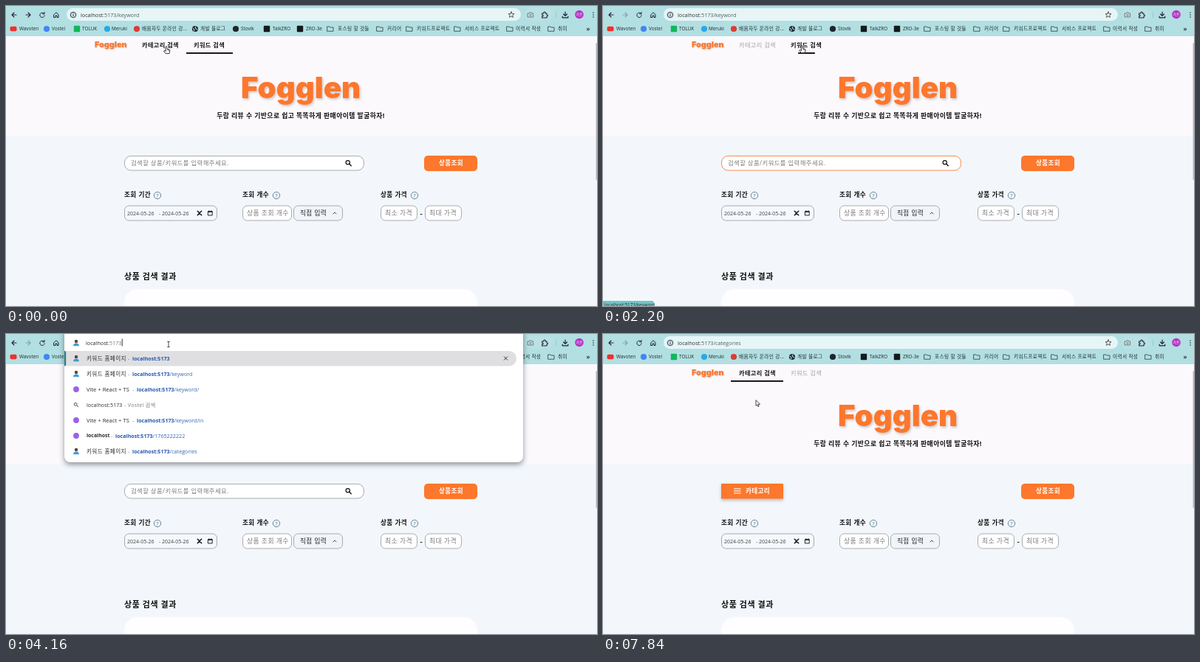
These frames come from a looping animation (800x407 px, 8000 ms). An HTML page with a canvas:

```html
<!DOCTYPE html>
<html lang="ko">
<head>
<meta charset="utf-8">
<title>Fogglen</title>
<style>
html, body { margin: 0; width: 100%; height: 100%; overflow: hidden; background: #f3f7fc; }
canvas { display: block; width: 800px; height: 407px; }
</style>
</head>
<body>
<canvas id="stage"></canvas>
<script>
const W = 800, H = 407, LOOP = 8000, STEP = 40;
const SANS = '"Open Sans", "Noto Sans CJK KR", "Noto Sans CJK", sans-serif';
const ORANGE = '#fd772c', INK = '#1c1c1e', GREY = '#7b7b7b', EDGE = '#a9abae';
const BRAND = 'Fogglen', HOST = 'localhost:5173';
const HANGUL = /[가-힣]/;

const canvas = document.getElementById('stage');
const dpr = window.devicePixelRatio || 1;
canvas.width = W * dpr;
canvas.height = H * dpr;
const c = canvas.getContext('2d');

// ---------- helpers ----------
// Hangul is set slightly smaller with open tracking.
function text(s, x, y, size, color = INK, weight = 400, align = 'left', family = SANS) {
  const korean = HANGUL.test(s), px = korean ? size * 0.95 : size;
  c.font = `${weight} ${px}px ${family}`;
  c.letterSpacing = korean ? `${px * 0.05}px` : '0px';
  c.textAlign = align;
  c.fillStyle = color;
  c.fillText(s, x, y + px * 0.36);
  return x + c.measureText(s).width;
}

function rect(x, y, w, h, fill) {
  c.fillStyle = fill;
  c.fillRect(x, y, w, h);
}

function paint(fill, stroke, lw) {
  if (fill) { c.fillStyle = fill; c.fill(); }
  if (stroke) { c.strokeStyle = stroke; c.lineWidth = lw; c.stroke(); }
}

function box(x, y, w, h, r, fill, stroke, lw = 1) {
  c.beginPath();
  c.roundRect(x, y, w, h, r);
  paint(fill, stroke, lw);
}

function dot(x, y, r, fill, stroke, lw = 1) {
  c.beginPath();
  c.arc(x, y, r, 0, 7);
  paint(fill, stroke, lw);
}

function icon(x, y, d, stroke, lw = 1, fill) {
  const p = new Path2D(d);
  c.save();
  c.translate(x, y);
  c.lineJoin = c.lineCap = 'round';
  if (fill) { c.fillStyle = fill; c.fill(p); }
  if (stroke) { c.strokeStyle = stroke; c.lineWidth = lw; c.stroke(p); }
  c.restore();
}

function shadowed(color, blur, dx, dy, draw) {
  c.save();
  c.shadowColor = color;
  c.shadowBlur = blur * dpr;
  c.shadowOffsetX = dx * dpr;
  c.shadowOffsetY = dy * dpr;
  draw();
  c.restore();
}

// ---------- timeline ----------
const visits = [
  { at: -1000, route: 'keyword' },
  { at: 380, route: 'categories' },
  { at: 2120, route: 'keyword' },
  { at: 6400, route: 'categories' }
];
const moves = [
  [0, 217, 54.5], [440, 215, 54], [840, 214, 54], [1240, 156, 15], [1560, 156, 15],
  [1980, 268, 53], [2360, 270, 54], [2720, 153, 14], [2800, 152, 14],
  [3200, 181, 14], [3400, 220, 14], [4580, 220, 14], [4720, 207, 26],
  [4840, 194, 19], [7140, 194, 19], [7320, 192, 12], [7840, 207, 90], [LOOP, 207, 90]
];

const between = (t, a, b) => t >= a && t < b;

function pointer(t) {
  const i = moves.findIndex(m => m[0] > t);
  const [t0, x0, y0] = moves[i - 1], [t1, x1, y1] = moves[i];
  const k = (t - t0) / (t1 - t0), e = k * k * (3 - 2 * k);
  return { x: x0 + (x1 - x0) * e, y: y0 + (y1 - y0) * e };
}

function stateAt(t) {
  const visit = visits.filter(v => v.at <= t).pop();
  const p = pointer(t);
  const k = Math.min(1, (t - visit.at) / 400);
  const onTabs = p.y > 42 && p.y < 66;
  return {
    t, p, route: visit.route,
    grow: 1 - (1 - k) * (1 - k),
    canForward: visit === visits[0],
    hover: onTabs && between(p.x, 173, 244) ? 'categories'
      : onTabs && between(p.x, 244, 307) ? 'keyword' : '',
    focused: between(t, 2120, 3720) || between(t, 6240, 6400),
    editing: between(t, 3720, 4120),
    open: between(t, 4120, 6360),
    status: between(t, 120, 920) ? 'categories' : between(t, 1960, 2440) ? 'keyword' : ''
  };
}

// ---------- browser chrome ----------
const bookmarks = [
  ['Wavoten', 18, 10, '#f0302b', 'pill'], ['Vostel', 62, 55, '#4285f4', 'dot'],
  ['TOLUK', 103, 96, '#12b75a', 'square'], ['Meruki', 143, 137, '#28a9e6', 'dot'],
  ['배움자두 온라인 강...', 184, 177, '#dd3a35', 'dot'], ['개발 블로그', 263, 256, '#24303a', 'globe'],
  ['Stovik', 318, 311, '#20252b', 'dot'], ['TalkZRO', 361, 353, '#16191c', 'square'],
  ['ZRO-3e', 406, 398, '#16191c', 'square'], ['포스팅 할 것들', 449, 439],
  ['커리어', 516, 506], ['키워드프로젝트', 556, 546], ['서비스 프로젝트', 621, 611],
  ['이력서 작성', 690, 682], ['취미', 747, 738]
];

function bookmark([label, tx, x, color, kind = 'folder']) {
  const y = 31;
  if (kind === 'pill') box(x - 4.5, y - 3.2, 9, 6.4, 2, color);
  if (kind === 'square') box(x - 4.2, y - 4.2, 8.4, 8.4, 1, color);
  if (kind === 'dot' || kind === 'globe') dot(x, y, 4.1, color);
  if (kind === 'globe') icon(x, y, 'M-3 -1L-1 1L-1.5 3M1 -3L0 -1L3 1', '#cfe6ea', 1);
  if (kind === 'folder') icon(x, y, 'M-4 -3H-1L0 -2H4V3.2H-4Z', '#3f4b4f', 0.9);
  text(label, tx, y, HANGUL.test(label) ? 7 : 6.4, '#1f2b2e');
}

function star(x, y) {
  let d = '';
  for (let i = 0; i < 10; i++) {
    const a = i * Math.PI / 5 - Math.PI / 2, r = i % 2 ? 1.9 : 4.2;
    d += `${i ? 'L' : 'M'}${r * Math.cos(a)} ${r * Math.sin(a)}`;
  }
  icon(x, y, d + 'Z', '#333', 0.8);
}

function person(x, y) {
  dot(x, y - 2, 2.2, '#5b4637');
  icon(x, y, 'M-4 4.2Q-3.6 .6 0 .6Q3.6 .6 4 4.2Z', null, 0, '#3f9bd6');
}

function toolbar(s) {
  rect(0, 0, W, 41, '#b2dfe2');
  icon(11, 12, 'M3 0H-3M0 -3L-3 0L0 3', '#223', 1.1);
  icon(30, 12, 'M-3 0H3M0 -3L3 0L0 3', s.canForward ? '#223' : '#7fa3a7', 1.1);
  icon(49, 12, 'M2.6 -1.6A3.2 3.2 0 1 0 3.2 .8M3 -3.6V-1.2H.6', '#223', 1);
  icon(68, 12, 'M-3 -.4L0 -3.2L3 -.4V3.5H1V1H-1V3.5H-3Z', '#223', 1);
  const hover = s.p.y < 20 && s.p.x > 82;
  box(82, 3, 615, 17, 8.5, s.editing ? '#fff' : hover ? '#dff1f2' : '#e7f5f6',
    s.editing ? '#2b7a80' : null);
  dot(91, 12, 5.6, '#d3ecee');
  dot(91, 12, 3.6, null, '#223', 0.9);
  rect(90.6, 11.3, 0.9, 2.6, '#223');
  rect(90.6, 9.8, 0.9, 0.9, '#223');
  if (s.editing) rect(100, 6, 80, 12, '#a9cdf5');
  const end = text(HOST.slice(0, 9), 101, 12, 7.2, '#2a3537');
  text(HOST.slice(9) + '/' + s.route, end, 12, 7.2, '#4f6266');
  star(684, 12);

  box(702, 3, 39, 17, 8.5, '#bae1e4');
  icon(710, 12, 'M-3.6 -2H-1.8L-1 -3.2H1L1.8 -2H3.6V3H-3.6Z', '#777b7c', 1);
  dot(710, 12.4, 1.2, null, '#777b7c', 0.8);
  icon(729, 12, 'M-3.4 -2H-1.2Q-1.4 -4 0 -4Q1.4 -4 1.2 -2H3V0Q4.6 0 4.4 1.2Q4.4 2 3 2V4H-3.4V2Q-1.8 2 -1.8 1Q-1.8 0 -3.4 0Z', '#223', 1.1);
  rect(744, 8, 0.7, 8, '#8fc4c8');
  icon(757, 12, 'M0 -4V1.2M-2.4 -1L0 1.4L2.4 -1M-3.8 2V3.8H3.8V2', '#223', 1.2);
  dot(776, 11.5, 5.8, '#b535c4');
  text('가온', 776, 11.5, 4.8, '#fff', 400, 'center');
  for (const y of [9, 12, 15]) dot(795, y, 0.8, '#223');

  bookmarks.forEach(bookmark);
  text('»', 788, 30.5, 9, '#223', 600, 'center');
}

// ---------- page ----------
function logo(x, y, size, align, depth) {
  shadowed('rgba(90,60,40,.27)', depth * 1.6, depth * 0.8, depth, () =>
    text(BRAND, x, y, size, ORANGE, 900, align, 'Inter, Lato, sans-serif'));
}

function tab(s, name, label, x, left, width) {
  const active = s.route === name, lit = active || s.hover === name;
  text(label, x, 53, 8.6, lit ? '#111' : '#a3a3a3', lit ? 700 : 500);
  if (active) rect(left + width / 2 * (1 - s.grow), 63, width * s.grow, 1.8, '#000');
}

function heading(label, x, markX) {
  text(label, x, 256, 9.1, '#111', 700);
  dot(markX, 257, 4.7, null, '#56788c', 0.9);
  text('?', markX, 257, 7, '#476b80', 400, 'center');
}

function field(x, w, label, tx, size, fill = '#fff', color = GREY) {
  box(x + 0.5, 271, w - 1, 20, 6, fill, EDGE);
  if (label) text(label, tx, 281, size, color);
}

function searchBox(s) {
  box(160.5, 203.5, 324, 19.5, 8.5, '#fff', s.focused ? '#f58a50' : EDGE);
  text('검색할 상품/키워드를 입력해주세요.', 169, 213, 8.8, GREY);
  if (s.focused && s.t > 6200) rect(168.5, 207, 0.9, 12, '#222');
  dot(462.7, 212.2, 2.6, null, '#111', 1.2);
  icon(464.8, 214.3, 'M0 0L2.4 2.4', '#111', 1.5);
}

function categoryButton() {
  shadowed('rgba(90,60,40,.3)', 4, 0, 2, () => rect(160, 203, 84, 20.5, ORANGE));
  for (const y of [209.4, 212.4, 215.4]) rect(177, y, 9.6, 1.1, '#fff');
  text('카테고리', 193, 213, 9, '#fff', 700);
}

function page(s) {
  rect(0, 41, W, 366, '#f3f7fc');
  rect(0, 41, W, 135, '#fcf9fd');

  logo(120, 52.5, 10.8, 'left', 1);
  tab(s, 'categories', '카테고리 검색', 184, 173, 71);
  tab(s, 'keyword', '키워드 검색', 254, 244, 63);
  logo(399, 111, 40.2, 'center', 2);
  text('두람 리뷰 수 기반으로 쉽고 똑똑하게 판매아이템 발굴하자!', 399, 149, 9.3, '#111', 700, 'center');

  if (s.route === 'keyword') searchBox(s); else categoryButton();
  box(566, 203, 72, 21, 5, ORANGE);
  text('상품조회', 602.5, 213, 9, '#fff', 700, 'center');

  heading('조회 기간', 160, 205);
  heading('조회 개수', 320, 366);
  heading('상품 가격', 507, 553);

  field(160, 126, '2024-05-26', 164, 7, '#f5f8fc', '#444');
  text('-', 207, 281, 7, '#444');
  text('2024-05-26', 211, 281, 7, '#444');
  icon(262, 281, 'M-2.7 -2.7L2.7 2.7M2.7 -2.7L-2.7 2.7', '#111', 1.5);
  icon(276.5, 281, 'M-2.7 -2.4H2.7V3H-2.7ZM-2.7 -1.6H2.7M-1.6 -3.2V-2.4M1.6 -3.2V-2.4', '#111', 0.9);
  field(320, 67, '상품 조회 개수', 326, 9.3);
  field(389, 67, '직접 입력', 398, 9.1, '#f1f5fa', '#222');
  icon(445, 281, 'M-2.1 1L0 -1.1L2.1 1', '#333', 0.9);
  field(507, 50, '최소 가격', 513, 9.3);
  text('-', 562, 282, 10, '#111', 600, 'center');
  field(567, 50, '최대 가격', 573, 9.3);

  text('상품 검색 결과', 160, 367, 11.6, '#111', 700);
  box(160, 384, 478, 60, 18, '#fefdff');

  box(798.6, 50, 2, 186, 1, '#b4b6b9');
  if (s.status) {
    box(-4, 400, s.status === 'keyword' ? 73 : 82, 12, 3, '#74c3c6');
    text(`${HOST}/${s.status}`, 2, 405.5, 6.2, '#16383b');
  }
}

// ---------- address suggestions ----------
const rows = [
  ['키워드 홈페이지', '', 171], ['키워드 홈페이지', '/keyword', 171],
  ['Vite + React + TS', '/keyword/', 177], null,
  ['Vite + React + TS', '/keyword/in', 177], ['localhost', '/1765222222', 148],
  ['키워드 홈페이지', '/categories', 171]
];

function suggestion(row, i) {
  const y = 33 + i * 21;
  if (!row) {
    dot(94.2, y - 0.7, 1.9, null, '#444', 0.9);
    icon(95.7, y + 0.8, 'M0 0L2 2', '#444', 1);
    text(HOST, 109, y, 7.2, '#333');
    text('- Vostel 검색', 160, y, 7.4, GREY);
    return;
  }
  const [title, path, x] = row;
  const local = title === 'localhost', korean = HANGUL.test(title);
  if (korean) person(95, y); else dot(95, y, 3.9, '#9a62e8');
  text(title, 109, y, korean ? 8 : local ? 6.9 : 7.6, '#2b2b2d', local ? 700 : 400);
  text('-', x - 6, y, 7.4, GREY);
  const end = text(HOST, x, y, 7.1, '#2559ae', 700);
  text(path, end, y, 7.2, '#3767b5');
}

function suggestions(s) {
  shadowed('rgba(30,40,50,.5)', 7, 0, 3, () => box(79, -10, 621, 184, 8, '#fff'));
  person(95, 12);
  const mid = text(HOST.slice(0, 9), 108, 12, 7.2, '#2b2b2d');
  const end = text(HOST.slice(9), mid, 12, 7.2, GREY);
  if (Math.floor((s.t - 4120) / 520) % 2 === 0) rect(end + 0.3, 6.5, 0.9, 10, '#222');
  box(79, 23, 612, 20.5, [0, 10, 10, 0], '#dfdfe2');
  box(79, 23, 2.2, 20.5, [0, 2, 2, 0], '#2f7f80');
  icon(676.5, 33, 'M-2.2 -2.2L2.2 2.2M2.2 -2.2L-2.2 2.2', '#333', 1);
  rows.forEach(suggestion);
}

// ---------- pointer ----------
function drawPointer(s) {
  const { x, y } = s.p;
  if (s.hover && !s.open) {
    icon(x, y, 'M-1 .8Q0 -.6 1 .8V4L4 4.6Q5 5 4.8 6.2L4 10H-.8L-3.6 6.6Q-3.4 5.2 -1 6.6Z', '#222', 0.9, '#fff');
    icon(x, y, 'M2.2 4.4V6M3.5 4.7V6', '#222', 0.5);
  } else if (y < 18 && x > 82) {
    icon(x, y, 'M-1.3 -3.5H1.3M0 -3.5V3.5M-1.3 3.5H1.3', '#222', 0.8);
  } else {
    icon(x, y, 'M0 0V7.4L1.7 5.9L2.9 8.6L4.1 8L2.9 5.4H5.2Z', '#222', 0.8, '#fff');
  }
}

function draw(t) {
  const s = stateAt(t);
  c.setTransform(dpr, 0, 0, dpr, 0, 0);
  page(s);
  toolbar(s);
  if (s.open) suggestions(s);
  drawPointer(s);
}

let start;
function tick(now) {
  start ??= now;
  const t = (now - start) % LOOP;
  draw(t - t % STEP);
  requestAnimationFrame(tick);
}
requestAnimationFrame(tick);
</script>
</body>
</html>
```
